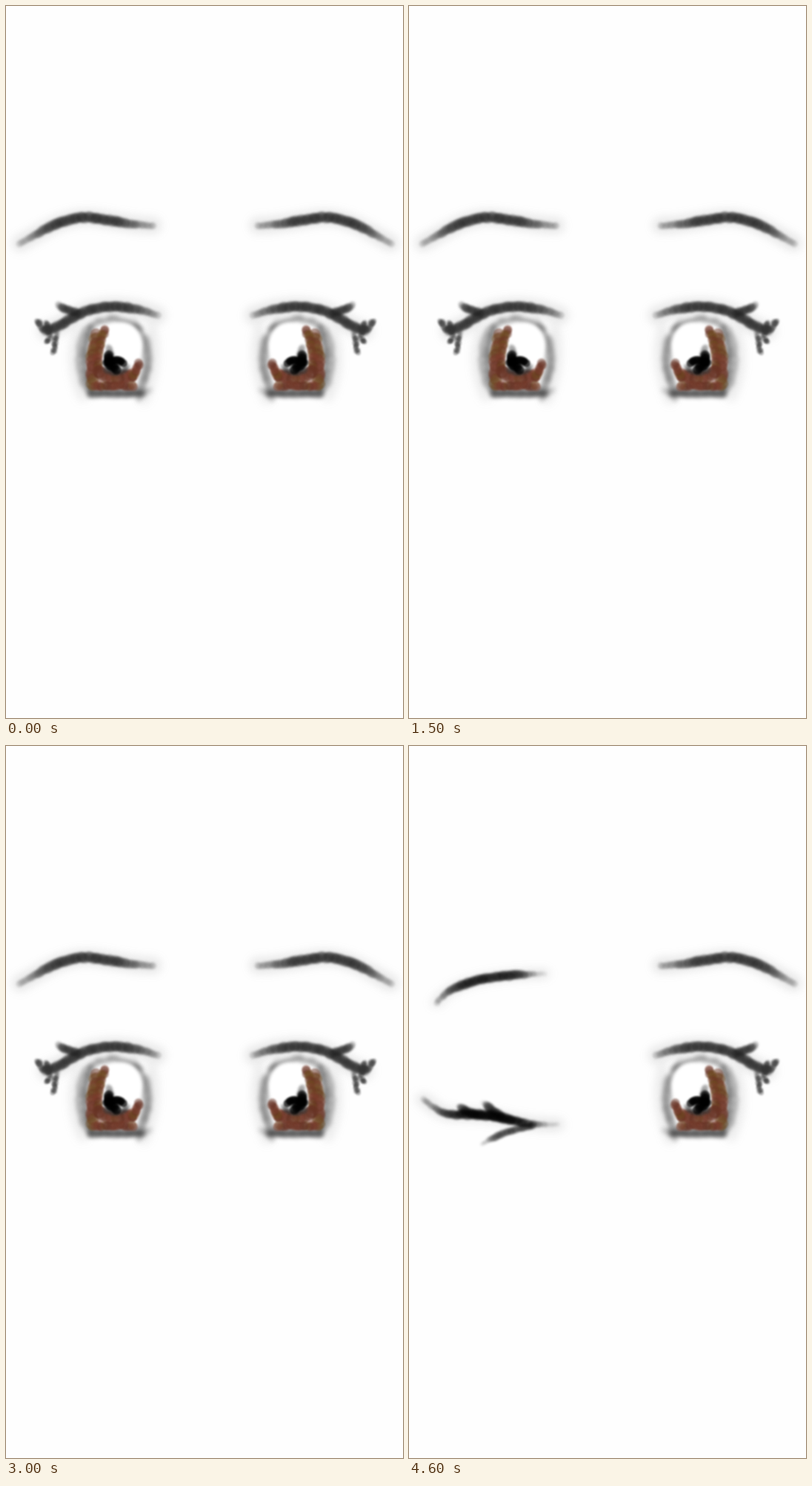
Recreate the animation shown at these times as an HTML page. Size 536x960 px, loop 5000 ms.

```html
<!DOCTYPE html>
<html lang="en">
<head>
<meta charset="utf-8">
<title>Blinking eyes</title>
<style>
html, body { margin: 0; width: 100%; height: 100%; overflow: hidden; background: #fefefe; }
svg { display: block; width: 100%; height: 100%; }
.ink { filter: blur(1px); }
.soft { filter: blur(1.7px); }
.smoke { filter: blur(2.5px); }
.haze { filter: blur(6px); }
</style>
</head>
<body>
<svg viewBox="0 0 536 960">
  <defs>
    <g id="openEye"></g>
    <g id="shutBrow"></g>
    <g id="shutLash"></g>
  </defs>
  <use id="leftOpen" href="#openEye"/>
  <use id="rightOpen" href="#openEye" transform="translate(538.5) scale(-1 1)"/>
  <g id="leftShut"><use href="#shutBrow"/><use href="#shutLash"/></g>
  <g id="rightShut" transform="translate(540.5) scale(-1 1)"><use href="#shutBrow"/><use href="#shutLash"/></g>
  <g id="leftWink">
    <use href="#shutBrow" transform="translate(5 -13) scale(1.055 1)"/>
    <use href="#shutLash" transform="translate(1 -1) scale(1.085 1.003)"/>
  </g>
</svg>
<script>
const $ = id => document.getElementById(id);
const NS = 'http://www.w3.org/2000/svg';

let seed = 7;
const rnd = () => (seed = seed * 16807 % 2147483647) / 2147483647;
const spread = n => (rnd() - 0.5) * 2 * n;
const ease = u => u >= 1 ? 1 : u * u * (3 - 2 * u);
const mix = (a, b, u) => a + (b - a) * u;

function add(parent, tag, attrs) {
  const el = document.createElementNS(NS, tag);
  for (const k in attrs) el.setAttribute(k, attrs[k]);
  return parent.appendChild(el);
}
const layer = (parent, cls) => add(parent, 'g', { class: cls });

// Overlapping dabs along a path; head and tail thin and fade the two ends
function brush(parent, colors, d, r, { head = 1, tail = 1, alpha = 0.4, jitter = 0.8 } = {}) {
  const path = document.createElementNS(NS, 'path');
  path.setAttribute('d', d);
  const len = path.getTotalLength();
  const n = Math.ceil(len / (r * 0.45));
  const palette = [].concat(colors);
  for (let i = 0; i <= n; i++) {
    const u = i / n, p = path.getPointAtLength(u * len);
    const k = mix(head, 1, ease(u / 0.3)) * mix(tail, 1, ease((1 - u) / 0.3));
    add(parent, 'circle', {
      cx: (p.x + spread(jitter)).toFixed(1),
      cy: (p.y + spread(jitter)).toFixed(1),
      r: (r * (0.4 + 0.6 * k)).toFixed(1),
      fill: palette[Math.floor(rnd() * palette.length)],
      opacity: (alpha * k).toFixed(3)
    });
  }
}

function haze(parent, d, width, opacity = 0.16) {
  add(layer(parent, 'haze'), 'path', { d, stroke: '#777', 'stroke-width': width, opacity, fill: 'none', 'stroke-linecap': 'round' });
}

function drawBall(g) {
  const shade = layer(g, 'smoke');
  const gray = (d, r, alpha) => brush(shade, '#555', d, r, { alpha, jitter: 1.5 });
  gray('M110 436Q92 476 112 518', 8, 0.13);
  gray('M114 434Q100 478 114 520', 5, 0.16);
  gray('M112 434Q146 408 181 437', 5, 0.14);
  gray('M172 428Q202 464 181 514', 6.5, 0.15);
  gray('M189 446Q200 476 187 506', 5, 0.08);
  gray('M112 518L184 518', 6, 0.18);
  gray('M178 530L194 517', 5, 0.08);
  brush(shade, '#333', 'M113 524L184 523', 5, { alpha: 0.27 });

  add(layer(g, 'smoke'), 'ellipse', { cx: 157, cy: 456, rx: 27, ry: 29, fill: '#fff' });

  const iris = layer(g, 'ink');
  const browns = ['#6b3626', '#7a3b2b', '#6e4a20', '#633022'];
  const paint = (d, r) => brush(iris, browns, d, r, { alpha: 0.5, jitter: 1.5 });
  paint('M123 444Q113 470 117 508', 8);
  paint('M134 436Q122 460 124 490', 6);
  paint('M124 492Q145 510 172 496', 9);
  paint('M117 512L172 512', 6);
  paint('M170 502L180 482', 6);

  const pupil = layer(g, 'soft');
  brush(pupil, '#444', 'M138 458L142 472', 5, { alpha: 0.2, head: 0.3 });
  brush(pupil, '#333', 'M134 490Q148 501 164 487', 4, { alpha: 0.25 });
  const core = layer(g, 'ink');
  brush(core, '#000', 'M138 471L139 484L149 490', 6.5, { alpha: 0.7 });
  brush(core, '#000', 'M135 481Q148 474 158 481', 5.5, { alpha: 0.7 });
}

function drawOpen(g) {
  const brow = 'M19 320C50 303 78 284 112 285C140 288 165 295 199 296';
  const lid = 'M204 417C180 408 150 402 120 408S80 432 54 438';
  haze(g, brow, 22);
  haze(g, lid, 24);
  haze(g, 'M98 440Q84 482 104 526', 14, 0.14);
  haze(g, 'M196 436Q206 482 186 530', 14, 0.14);
  brush(layer(g, 'soft'), '#1c1c1c', brow, 7.4, { head: 0.4, tail: 0.4, alpha: 0.36 });

  drawBall(g);

  const lash = layer(g, 'soft');
  brush(lash, '#1c1c1c', lid, 7.3, { head: 0.5, alpha: 0.36 });
  brush(lash, '#222', 'M71 403Q78 410 96 413', 6, { head: 0.6, alpha: 0.36 });
  const specks = layer(g, 'ink');
  const speck = (d, r) => brush(specks, '#333', d, r, { head: 0.6, alpha: 0.35, jitter: 1.8 });
  speck('M40 423L53 438', 4.5);
  speck('M54 426L57 442', 4);
  speck('M69 440L64 467', 3.5);
  speck('M60 445L54 454', 3.5);
}

function drawShutBrow(g) {
  const brow = 'M31 359C50 331 96 322 168 320';
  haze(g, brow, 14);
  brush(layer(g, 'soft'), '#050505', brow, 6.7, { head: 0.35, tail: 0.15, alpha: 0.38 });
}

function drawShutLash(g) {
  const lid = 'M17 476C32 488 38 497 58 497S95 497 112 501S155 511 183 510';
  haze(g, lid, 18);
  const ink = layer(g, 'soft');
  const hair = (d, r, alpha) => brush(ink, '#050505', d, r, { head: 0.25, alpha });
  hair('M90 536Q118 518 154 511', 5, 0.25);
  hair('M60 484Q68 492 82 496', 6, 0.35);
  hair('M92 480Q102 490 114 499', 6, 0.35);
  brush(ink, '#050505', lid, 6.3, { head: 0.35, tail: 0.15, alpha: 0.38 });
  brush(ink, '#050505', 'M62 495Q96 494 140 507', 7, { head: 0.5, tail: 0.4, alpha: 0.35 });
}

drawOpen($('openEye'));
drawShutBrow($('shutBrow'));
drawShutLash($('shutLash'));

const show = (id, on) => $(id).setAttribute('display', on ? 'inline' : 'none');

function render(ms) {
  const t = ms % 5000;
  const shut = (t >= 1000 && t < 1500) || (t >= 2500 && t < 3000);
  const wink = t >= 4000;
  show('leftOpen', !shut && !wink);
  show('rightOpen', !shut);
  show('leftShut', shut);
  show('rightShut', shut);
  show('leftWink', wink);
}

const start = performance.now();
function tick() {
  render(performance.now() - start);
  requestAnimationFrame(tick);
}
render(0);
requestAnimationFrame(tick);
</script>
</body>
</html>
```
